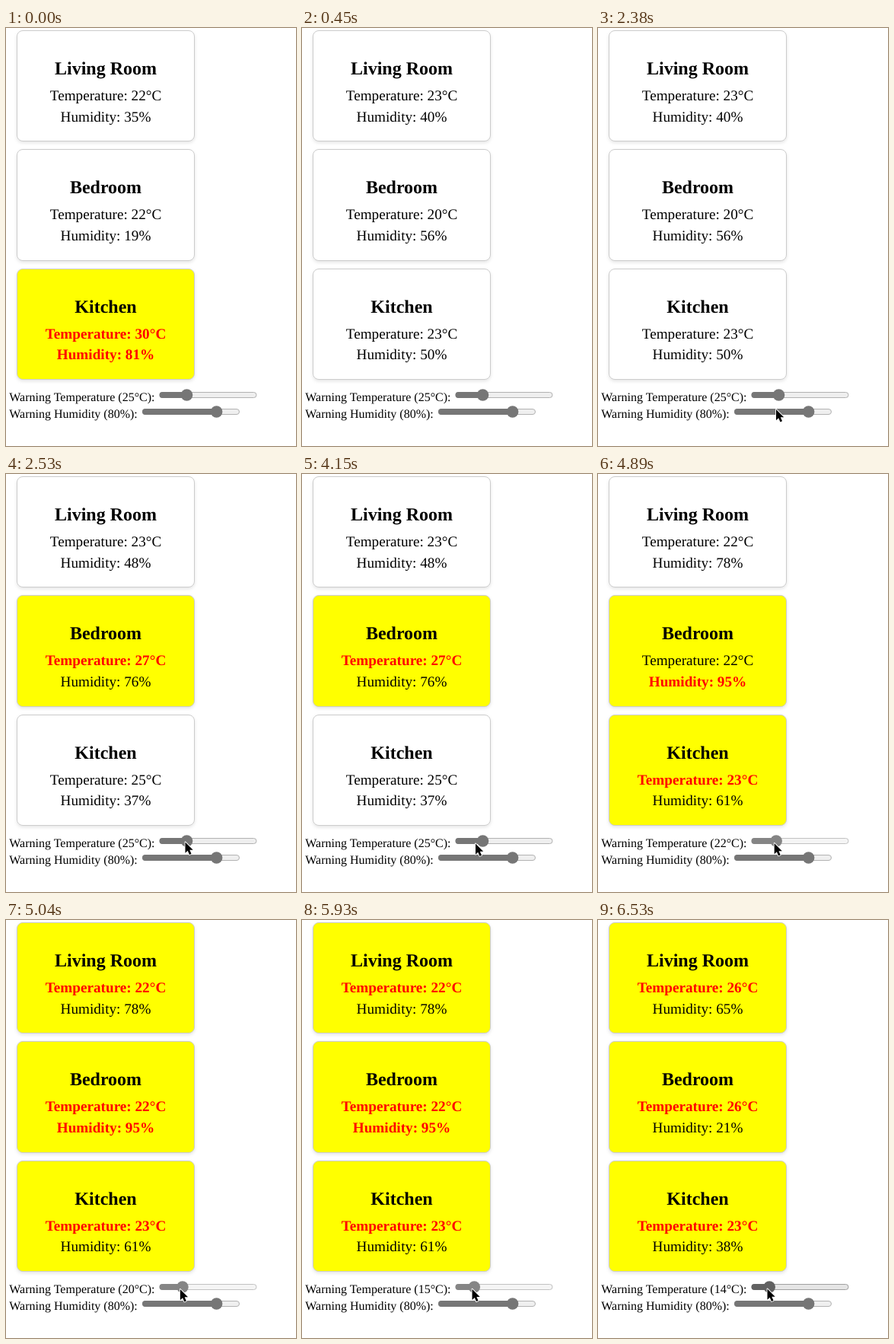
An HTML page for the animation above (8 s loop, 381 px wide and 549 px high).

```html
<!DOCTYPE html>
<html lang="en">
<head>
<meta charset="utf-8">
<title>Room climate</title>
<style>
  html, body { margin: 0; width: 100%; height: 100%; overflow: hidden; background: #fff; }
  svg {
    display: block; width: 381px; height: 549px;
    font: 16px "Liberation Serif", "Times New Roman", serif;
    text-rendering: geometricPrecision;
  }
  .card rect { stroke: #ccc; fill: #fff; filter: drop-shadow(0 2px 2px rgba(0, 0, 0, .1)); }
  .card text { font-size: 19.2px; text-anchor: middle; }
  .card .title { font-size: 24px; font-weight: bold; }
  .card.alert rect { fill: #ff0; }
  .card .warn { fill: #f00; font-weight: bold; }
</style>
</head>
<body>
<svg id="stage" viewBox="0 0 381 549"></svg>
<script>
const LOOP = 8000;
const TICK = 148; // the picture refreshes in steps of this many ms
const HUMIDITY_LIMIT = 80;
const START_LIMIT = 25;
const HOVER = 29, PRESS = 30, RELEASE = 44; // in ticks
const GRIP = 2.7; // thumb centre relative to the pointer while dragging

// Successive sensor readings, a new one every REFRESH ticks.
const REFRESH = 13.35, FIRST_REFRESH = 2.9;
const rooms = [
  { name: "Living Room", readings: "22°C 35%, 23°C 40%, 23°C 48%, 22°C 78%, 26°C 65%" },
  { name: "Bedroom", readings: "22°C 19%, 20°C 56%, 27°C 76%, 22°C 95%, 26°C 21%" },
  { name: "Kitchen", readings: "30°C 81%, 23°C 50%, 25°C 37%, 23°C 61%, 23°C 38%" }
];

// Pointer strokes: the pointer glides to (x, y) and rests until the next one.
const home = { x: 237, y: 565 };
const strokes = [
  { from: 9, to: 10, x: 237.5, y: 520 },
  { from: 10, to: 12, x: 209, y: 562 },
  { from: 12, to: 14, x: 214.5, y: 543.5 },
  { from: 14, to: 16, x: 234, y: 501 },
  { from: 16, to: 17, x: 235.5, y: 483.5 },
  { from: 22, to: 23, x: 228, y: 485.5 },
  { from: 28, to: 29, x: 235, y: 485 },
  { from: 32, to: 36, x: 225.5, y: 485 },
  { from: 39, to: 41, x: 222.5, y: 484.5 }
];

// Fill, track and border colours of the range control.
const palette = {
  idle: ["#767676", "#efefef", "#b2b2b2"],
  hover: ["#616161", "#e5e5e5", "#a0a0a0"],
  active: ["#858585", "#f5f5f5", "#c2c2c2"]
};

const stage = document.getElementById("stage");
const clamp = v => Math.min(1, Math.max(0, v));
const easeOut = p => 1 - (1 - p) ** 1.5;

function set(el, attrs) {
  for (const key in attrs) el.setAttribute(key, attrs[key]);
}

function add(parent, tag, attrs = {}, text = "") {
  const el = document.createElementNS("http://www.w3.org/2000/svg", tag);
  set(el, attrs);
  el.textContent = text;
  return parent.appendChild(el);
}

function makeCard({ name, readings }, i) {
  const y = 2.9 + 156.4 * i;
  const top = Math.round(y);
  const height = Math.round(y + 146.4) - top;
  const g = add(stage, "g", { class: "card" });
  add(g, "rect", { x: 14.5, y: top + .5, width: 233, height: height - 1, rx: 7.5 });
  const line = (dy, cls, text) => add(g, "text", { x: 131, y: Math.round(y + dy), class: cls }, text);
  line(58.1, "title", name);
  const samples = readings.split(", ").map(pair => pair.split(" "));
  return { g, samples, temp: line(92, ""), hum: line(119.7, "") };
}

function makeSlider(x, y) {
  const left = x + 8, scale = 1.12;
  const track = add(stage, "rect", { x: x + .5, y: y - 3.5, width: 127, height: 7, rx: 3.5 });
  const fill = add(stage, "rect", { x, y: y - 4, height: 8, rx: 4 });
  const thumb = add(stage, "circle", { cy: y, r: 7.8 });
  return {
    valueAt: px => Math.round((px - left) / scale),
    show(value, mode) {
      const [main, back, edge] = palette[mode];
      const cx = left + value * scale;
      set(track, { fill: back, stroke: edge });
      set(fill, { width: cx - x, fill: main });
      set(thumb, { cx, fill: main });
    }
  };
}

const cards = rooms.map(makeCard);
const limitLabel = add(stage, "text", { x: 4.3, y: 490 });
add(stage, "text", { x: 4.3, y: 512 }, `Warning Humidity (${HUMIDITY_LIMIT}%):`);
const tempSlider = makeSlider(201.5, 482);
makeSlider(179, 504).show(HUMIDITY_LIMIT, "idle");
const arrow = add(stage, "path", {
  d: "M0 0V14.2L3.2 11.2L5.5 16.4L8 15.3L5.8 10.2H10.2Z",
  stroke: "#fff", "stroke-width": 1.8, "stroke-linejoin": "round", "paint-order": "stroke"
});

function pointerAt(tick) {
  return strokes.reduce((p, s) => {
    const k = easeOut(clamp((tick - s.from) / (s.to - s.from)));
    return { x: p.x + (s.x - p.x) * k, y: p.y + (s.y - p.y) * k };
  }, home);
}

function sliderMode(tick) {
  if (tick < HOVER) return "idle";
  return tick >= PRESS && tick < RELEASE ? "active" : "hover";
}

function show(el, text, warn) {
  el.textContent = text;
  el.classList.toggle("warn", warn);
}

function draw(t) {
  const tick = Math.floor(t / TICK);
  const { x, y } = pointerAt(tick);
  const limit = tick < PRESS ? START_LIMIT : tempSlider.valueAt(x + GRIP);
  const sample = Math.floor((tick - FIRST_REFRESH) / REFRESH) + 1;
  for (const card of cards) {
    const [temp, hum] = card.samples[sample];
    const hot = parseInt(temp) > limit;
    const damp = parseInt(hum) > HUMIDITY_LIMIT;
    show(card.temp, `Temperature: ${temp}`, hot);
    show(card.hum, `Humidity: ${hum}`, damp);
    card.g.classList.toggle("alert", hot || damp);
  }
  limitLabel.textContent = `Warning Temperature (${limit}°C):`;
  tempSlider.show(limit, sliderMode(tick));
  set(arrow, { transform: `translate(${x} ${y})` });
}

const start = performance.now();
function frame() {
  draw((performance.now() - start) % LOOP);
  requestAnimationFrame(frame);
}
frame();
</script>
</body>
</html>
```
